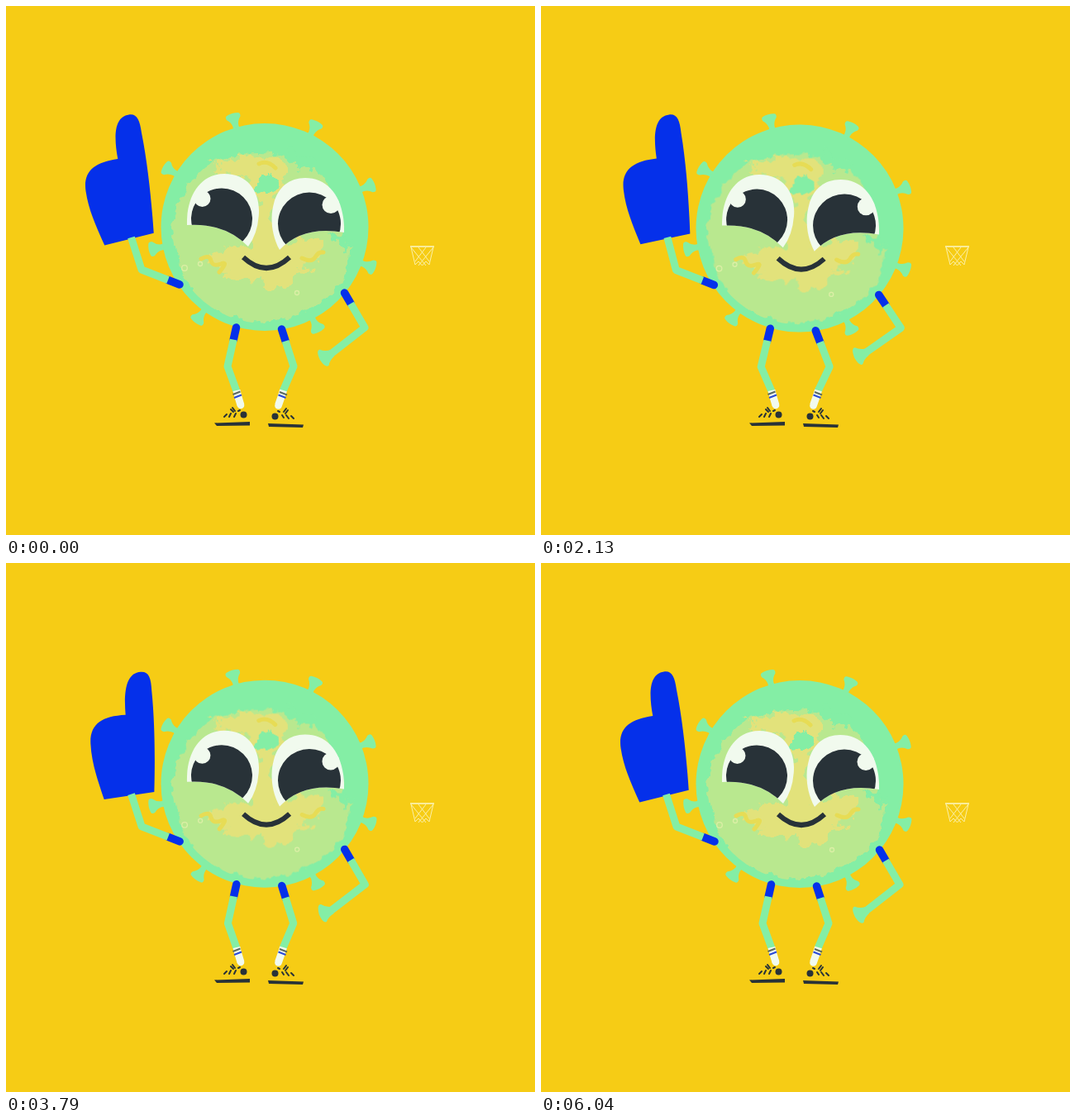
An HTML page that plays this animation: 640 by 640 pixels, repeating every 6080 ms.

```html
<!DOCTYPE html>
<html lang="en">
<head>
<meta charset="utf-8">
<title>Cheering germ</title>
<style>
  html, body { margin: 0; width: 100%; height: 100%; overflow: hidden; background: #f6cc15; }
  svg { display: block; width: 100vw; height: 100vh; }
  .skin { fill: #84eea5; }
  .ink { fill: #283238; }
  .white { fill: #f1faee; }
  .limb, .cuff { fill: none; stroke: #84eea5; stroke-width: 9; stroke-linejoin: round; }
  .cuff { stroke: #0530ea; stroke-width: 9.5; stroke-linecap: round; }
  .lace { fill: none; stroke: #283238; stroke-width: 2; stroke-linecap: round; }
</style>
</head>
<body>
<svg viewBox="0 0 640 640">
  <defs>
    <filter id="soft" filterUnits="userSpaceOnUse" x="180" y="130" width="270" height="270" color-interpolation-filters="sRGB">
      <feTurbulence type="fractalNoise" baseFrequency=".08" numOctaves="3" seed="3"/>
      <feDisplacementMap in="SourceGraphic" scale="14" xChannelSelector="R" yChannelSelector="G"/>
    </filter>
    <filter id="rough" filterUnits="userSpaceOnUse" x="180" y="130" width="270" height="270" color-interpolation-filters="sRGB">
      <feTurbulence type="fractalNoise" baseFrequency=".06" numOctaves="4" seed="8"/>
      <feDisplacementMap in="SourceGraphic" scale="34" xChannelSelector="R" yChannelSelector="G"/>
    </filter>
    <clipPath id="disc"><circle cx="313" cy="268" r="116"/></clipPath>
    <path id="eyeL" d="M219 265C218 230 235 203 264 203C293 203 307 225 306 250Q305 275 293 291Q265 262 219 265Z"/>
    <path id="eyeR" d="M331 295C320 275 320 253 324 239C329 219 343 208 362 208C391 208 410 233 409 274Q359 265 331 295Z"/>
    <clipPath id="clipL"><use href="#eyeL"/></clipPath>
    <clipPath id="clipR"><use href="#eyeR"/></clipPath>
    <path id="horn" d="M120 -4.500L127 -3.500Q133 -4 137 -8.500Q141 -10 142 -7Q144 0 142 7Q141 10 137 8.500Q133 4 127 3.500L120 4.500Z"/>
  </defs>

  <rect width="640" height="640" fill="#f6cc15"/>

  <g fill="none" stroke="#fbf0a8">
    <path d="M489 291H518" stroke-width="1.8"/>
    <path d="M490 292L495 313M517 292L512 313M490 292L508 314M499 292L512 309M517 292L499 314M508 292L495 309M495 313L499 309L503.500 314L508 309L512 313"/>
  </g>

  <g id="body">
    <g id="horns" class="skin" transform="translate(313 267.5)"></g>
    <circle class="skin" cx="313" cy="267.5" r="125.5"/>
    <g clip-path="url(#disc)">
      <path filter="url(#soft)" fill="#b9e88f" d="M200 268Q206 220 250 188Q312 164 368 192Q402 220 406 272L417 292Q412 345 368 367Q313 396 250 367Q205 335 200 268Z"/>
      <g filter="url(#rough)">
        <path fill="#e2e27b" d="M246 194Q280 174 330 188Q352 205 334 218L326 250L328 296Q360 276 384 284Q384 306 350 322Q330 352 290 328Q262 324 246 302Q262 284 290 296L304 230Q285 205 246 194Z"/>
        <path fill="#84eea5" d="M306 208h24l-6 16h-14zM340 176l34 10-18 20zM392 272l26 4-10 20z"/>
      </g>
      <g fill="none" stroke="#e7dc55" stroke-width="5" stroke-linecap="round">
        <path d="M236 306q10-6 12 2t12 4t-2 10M358 305q12 6 16-1t10-6M306 191q10-5 20 5"/>
      </g>
      <g fill="none" stroke="#dcefa6" stroke-width="1.3">
        <circle cx="216" cy="317" r="3.3"/><circle cx="235" cy="312" r="2.5"/><circle cx="352" cy="347" r="2.5"/>
      </g>
    </g>

    <use href="#eyeL" class="white"/>
    <circle class="ink" cx="261" cy="257.5" r="37" clip-path="url(#clipL)"/>
    <circle class="white" cx="237.5" cy="233" r="10"/>
    <use href="#eyeR" class="white"/>
    <circle class="ink" cx="367" cy="263.5" r="38" clip-path="url(#clipR)"/>
    <circle class="white" cx="393" cy="240.5" r="10.5"/>
    <path d="M287 304Q315 330 343 304" fill="none" stroke="#283238" stroke-width="6"/>
  </g>

  <path id="foam" fill="#0530ea" d="M124 285C117 260 111 240 111 217C111 193 126 184 155 184C154 156 158 133 176 133C186 133 188 141 188 157C190 195 188 240 185 279Z"/>
  <path id="fist" class="skin" d="M-2 -4.5Q5 -6 9 -11Q14 -12 15 0Q14 13 9 11Q5 6 -2 4.5Z"/>
  <g id="limbs"></g>

  <g id="shoes">
    <path d="M279 465L281 473L284 483" fill="none" stroke="#f1faee" stroke-width="9"/>
    <circle class="white" cx="284" cy="483" r="4.3"/>
    <path d="M274.5 470l9-3.5" stroke="#5c6a60" stroke-width="2"/>
    <path d="M276 474l9-3.5" stroke="#2a49d6" stroke-width="2"/>
    <path d="M335.5 465L333 473L329.5 483" fill="none" stroke="#f1faee" stroke-width="9"/>
    <circle class="white" cx="329.5" cy="483.5" r="4.3"/>
    <path d="M331 467l9 3.5" stroke="#5c6a60" stroke-width="2"/>
    <path d="M329.5 470.5l9 3.5" stroke="#2a49d6" stroke-width="2"/>

    <path class="ink" d="M252 504.5L295 503V507.5L255 508Z"/>
    <circle class="ink" cx="287.5" cy="494.5" r="4"/>
    <path class="lace" d="M264 497l3-3M270 497l2-4M276 497l2-4M272 488l3 3M274 486l3 4M281 490l2-1"/>
    <path class="ink" d="M317 505L360 506.500L359 510L318 509Z"/>
    <circle class="ink" cx="325.5" cy="496.5" r="4"/>
    <path class="lace" d="M348 499l-3-3M342 499l-3-4M336 498l-2-3M341 489l-3 4M339 487l-3 4M331 491l-2-1"/>
  </g>
</svg>
<script>
  const LOOP = 6080, CYCLES = 6, STEPS = 142;
  const HOLDS = [8, 31, 115];          // 24 fps ticks that repeat the pose before
  const CENTER = [313, 267.5];
  const NS = "http://www.w3.org/2000/svg";
  const $ = id => document.getElementById(id);
  const add = (parent, tag, attrs) => {
    const el = document.createElementNS(NS, tag);
    for (const k in attrs) el.setAttribute(k, attrs[k]);
    return parent.appendChild(el);
  };
  const move = (el, value) => el.setAttribute("transform", value);

  for (const a of [-106, -63.6, -21.5, 20.5, 62.5, 126, 169, 211])
    add($("horns"), "use", { href: "#horn", transform: `rotate(${a})` });

  const limbs = [0, 1, 2, 3].map(() => ({
    cuff: add($("limbs"), "path", { class: "cuff" }),
    skin: add($("limbs"), "path", { class: "limb" })
  }));

  // A limb starts with a 15 px cuff, then bends once
  function bend({ cuff, skin }, root, joint, end) {
    const dx = joint[0] - root[0], dy = joint[1] - root[1];
    const k = 15 / Math.hypot(dx, dy);
    const edge = [root[0] + dx * k, root[1] + dy * k];
    cuff.setAttribute("d", `M${root}L${edge}`);
    skin.setAttribute("d", `M${edge}L${joint}L${end}`);
  }

  const wave = (p, lead) => -Math.cos(2 * Math.PI * (p + lead));

  function pose(p) {
    const drop = 4.1 * (wave(p, .13) + .684);
    const u = drop / 6.8;
    const swing = wave(p, .045);
    const lean = .2 + 8.9 * swing;      // foam hand, from upright
    const h = (swing + .96) / 1.94;
    const tilt = 2.5 * u, r = tilt * Math.PI / 180;
    const onBody = (x, y) => {
      const dx = x - CENTER[0], dy = y - CENTER[1];
      return [CENTER[0] + dx * Math.cos(r) - dy * Math.sin(r),
              CENTER[1] + dx * Math.sin(r) + dy * Math.cos(r) + drop];
    };

    move($("body"), `translate(0 ${drop}) rotate(${tilt} ${CENTER})`);

    const px = 149.5 + 5.5 * u + h, py = 282 - 1.5 * h;
    move($("foam"), `translate(${px} ${py}) rotate(${lean}) translate(-155 -282)`);
    bend(limbs[0], onBody(210, 337), [164 - 3 * u, 319 + 2 * u], [px + 2, py - 2]);

    const wrist = [393 - u, 421 - 6 * u - 2 * h];
    move($("fist"), `translate(${wrist}) rotate(${151 + 34 * h})`);
    bend(limbs[1], onBody(409.5, 347), [434 + 5 * u + 2 * h, 389 + 2 * u], wrist);

    bend(limbs[2], onBody(278.5, 389), [268 - 8 * u, 436 + 2 * u], [279, 466]);
    bend(limbs[3], onBody(333.5, 391), [348 + 5 * u, 436 + 2 * u], [335, 466]);
  }

  const start = performance.now();
  function frame() {
    const t = (performance.now() - start) % LOOP;
    const tick = Math.floor(t * .024 + .1);
    const step = tick - HOLDS.filter(n => tick >= n).length;
    pose(step * CYCLES / STEPS);
    requestAnimationFrame(frame);
  }
  frame();
</script>
</body>
</html>
```
